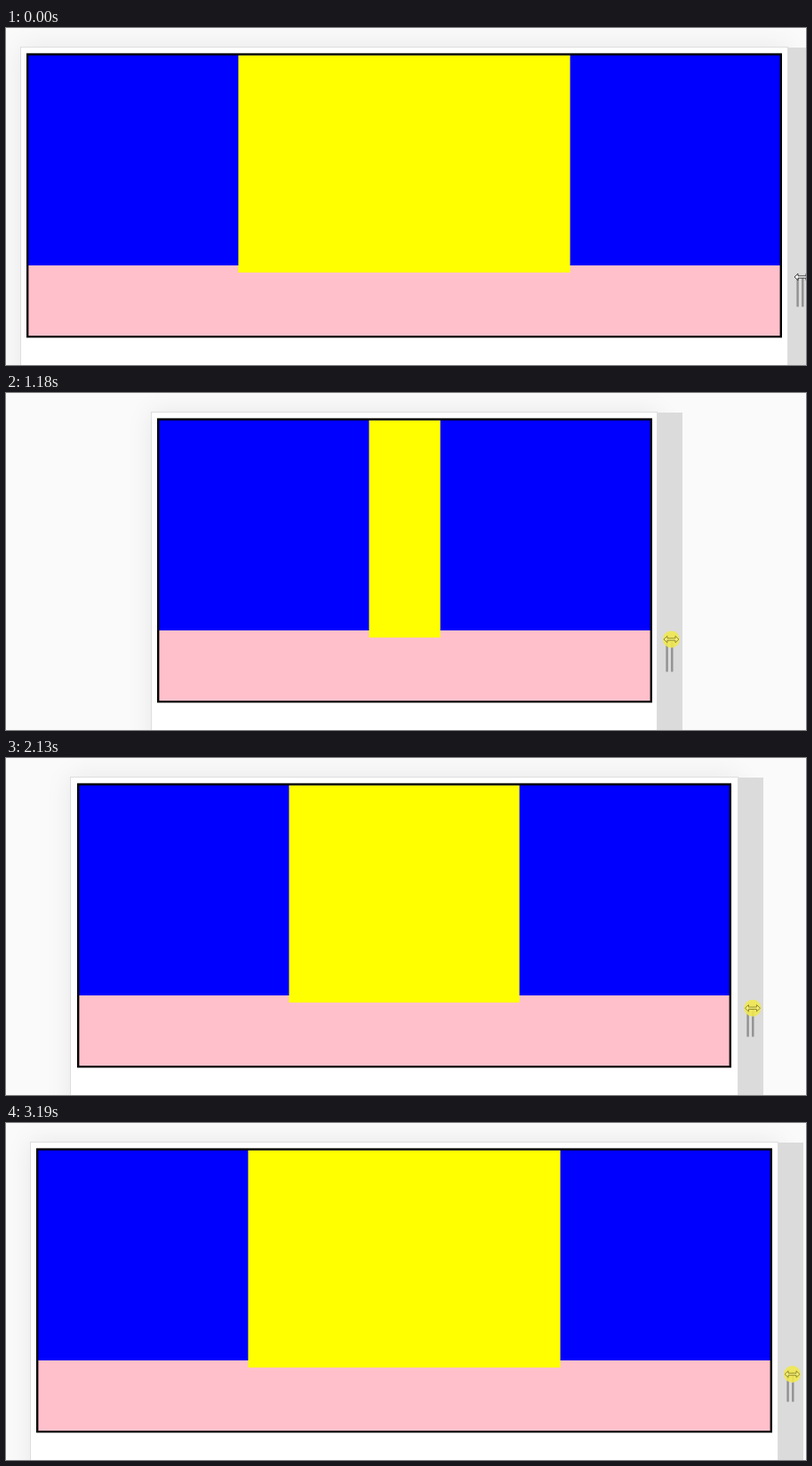
An HTML page with a canvas for the animation above (3.3 s loop, 900 by 379 pixels).

```html
<!DOCTYPE html>
<html>
<head>
<meta charset="utf-8">
<style>
  html, body { margin: 0; height: 100%; overflow: hidden; background: #fafafa; }
  canvas { display: block; width: 900px; height: 379px; }
</style>
</head>
<body>
<canvas id="stage" width="900" height="379"></canvas>
<script>
const ctx = document.getElementById('stage').getContext('2d');
const LOOP = 3300, STEP = 62.5, WIDTH = 896;

// drag path: time, left edge of the frame, left edge of the trailing content
const keys = [
  [0, 16, 16],
  [500, 127, 108.4],
  [562.5, 144, 140],
  [1062.5, 163, 163],
  [1375, 161, 162],
  [1562.5, 146, 149.8],
  [1875, 102, 104],
  [2437.5, 46.5, 46.6],
  [3187.5, 27, 27.2]
];

const rate = (i, col) => (keys[i + 1][col] - keys[i][col]) / (keys[i + 1][0] - keys[i][0]);

// slope that keeps the curve monotone between keys
function slope(i, col) {
  if (i === 0 || i === keys.length - 1) return 0;
  const a = rate(i - 1, col), b = rate(i, col);
  return a * b > 0 ? 2 * a * b / (a + b) : 0;
}

function smooth(u) {
  u = Math.min(1, Math.max(0, u));
  return u * u * (3 - 2 * u);
}

function valueAt(t, col) {
  const i = keys.findIndex(k => k[0] > t) - 1;
  if (i < 0) return keys[keys.length - 1][col];
  const [a, b] = [keys[i], keys[i + 1]], span = b[0] - a[0], u = (t - a[0]) / span;
  return a[col] + (b[col] - a[col]) * smooth(u)
    + span * u * (1 - u) * ((1 - u) * slope(i, col) - u * slope(i + 1, col));
}

function rect(color, x0, y0, x1, y1) {
  ctx.fillStyle = color;
  ctx.fillRect(x0, y0, x1 - x0, y1 - y0);
}

function drawFrame(left) {
  const right = WIDTH - left;
  ctx.save();
  ctx.shadowColor = 'rgba(0,0,0,.08)';
  ctx.shadowBlur = 28;
  rect('#fff', left, 21, right, 420);
  ctx.restore();
  ctx.strokeStyle = '#dedede';
  ctx.lineWidth = 1;
  ctx.strokeRect(left + .5, 21.5, right - left - 1, 400);
  rect('#dbdbdb', right, 22, right + 28, 379);
  for (const x of [right + 10.6, right + 16.3])
    rect('#919191', x - 1.2, 280, x + 1.2, 313.5);
}

function drawContent(left, frameLeft) {
  if (left < frameLeft - 1) rect('#fff', left, 22, WIDTH - left, 379);
  const x0 = Math.round(left + 7), x1 = Math.round(WIDTH - left - 6.6);
  const border = 2.4, side = 238.4;
  rect('#000', x0, 28.4, x1, 348.3);
  rect('#ffc0cb', x0 + border, 267, x1 - border, 346);
  rect('#00f', x0 + border, 30.8, x1 - border, 267);
  rect('#ff0', x0 + side, 30.8, x1 - side, 275);
}

function drawCursor(x, y, pressed) {
  if (pressed) {
    ctx.fillStyle = 'rgba(240,232,80,.9)';
    ctx.beginPath();
    ctx.arc(x, y, 9.5, 0, 7);
    ctx.fill();
  }
  const half = [[-8.5, 0], [-4.5, -3.7], [-4.5, -1.2], [4.5, -1.2], [4.5, -3.7]];
  ctx.beginPath();
  for (const s of [1, -1])
    for (const [dx, dy] of half) ctx.lineTo(x + s * dx, y + s * dy);
  ctx.closePath();
  ctx.fillStyle = pressed ? '#f3ec78' : '#fff';
  ctx.strokeStyle = pressed ? '#7d771f' : '#111';
  ctx.lineWidth = .8;
  ctx.fill();
  ctx.stroke();
}

function draw(now) {
  const t = Math.floor((now % LOOP + 10) / STEP) * STEP;
  const frame = Math.round(valueAt(t, 1)), content = valueAt(t, 2);
  // the pointer leads the handle and drifts up, then down
  const x = WIDTH - frame + 15.5 + .35 * (content - frame);
  const y = 277 + 3 * smooth(1 - t / 500) + 5.5 * smooth((t - 1250) / 1250);
  rect('#fafafa', 0, 0, 900, 379);
  drawFrame(frame);
  drawContent(content, frame);
  drawCursor(x, y, t > 0);
}

const start = performance.now();
function tick() {
  draw(performance.now() - start);
  requestAnimationFrame(tick);
}
tick();
</script>
</body>
</html>
```
